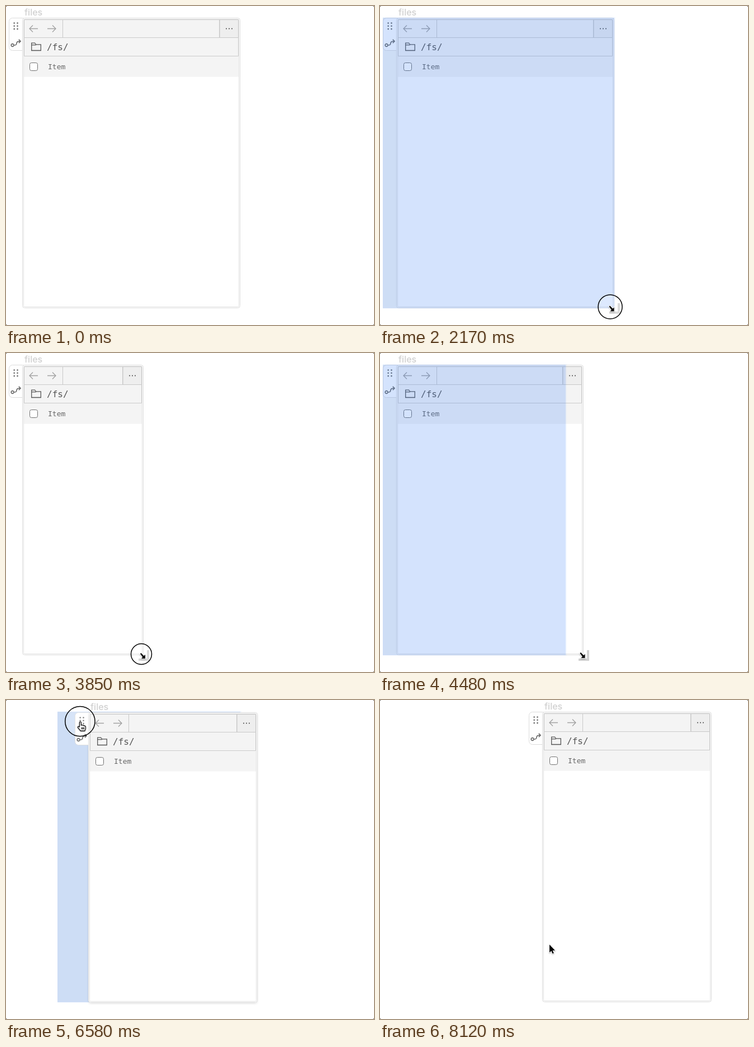
An HTML page with a canvas for the animation above (8.19 s loop, 658 by 570 pixels).

```html
<!DOCTYPE html>
<html lang="en">
<head>
<meta charset="utf-8">
<title>File panel</title>
<style>
  html, body { margin: 0; width: 100%; height: 100%; overflow: hidden; background: #fff; }
  canvas { display: block; width: 658px; height: 570px; }
</style>
</head>
<body>
<canvas id="stage" width="658" height="570"></canvas>
<script>
const ctx = document.getElementById('stage').getContext('2d');
const LOOP = 8190, TICK = 70, CELL = 87;
const MONO = '"DejaVu Sans Mono", monospace';
const GRIP = { x: 15.3, y: 36.3 };

const progress = (t, from, to) => Math.min(1, Math.max(0, (t - from) / (to - from)));
const ease = k => (1 - Math.cos(Math.PI * k)) / 2;
const mix = (a, b, k) => a + (b - a) * k;
const snap = v => CELL * Math.round(v / CELL);

// Pointer moves: start, end, destination
const moves = [
  [280, 840, 416, 538], [2100, 2800, 235, 517], [3220, 3710, 242, 538],
  [3850, 4480, 359.5, 537], [4480, 4830, 83, 130], [4970, 5180, 50, 84],
  [5320, 5600, 86, 66], [5600, 5950, GRIP.x, GRIP.y], [6230, 6930, 249.5, 40],
  [7630, 7840, 287, 240], [7980, 8120, 303, 437]
];
const presses = [
  { from: 1050, to: 1400, r: 19, grown: 32 },
  { from: 1540, to: 2800, r: 18.5, grown: 22.5 },
  { from: 3850, to: 4480, r: 18.5, grown: 20.5 },
  { from: 6090, to: 7210, r: 21.5, grown: 30.3 }
];
const highlights = [
  { from: 2170, release: 2800, to: 3150 },
  { from: 3990, release: 4480, to: 4830 },
  { from: 6300, release: 7140, to: 7420, drag: true }
];
const activeAt = (list, t) => list.find(s => t >= s.from && t < s.to);

function pointerAt(t) {
  let x = 356, y = 566;
  for (const [from, to, toX, toY] of moves) {
    const k = ease(progress(t, from, to));
    x = mix(x, toX, k);
    y = mix(y, toY, k);
  }
  return { x, y };
}

function panelRight(t, x) {
  if (t < 2100) return 418;
  if (t < 2800) return Math.min(418, Math.round(x + 10));
  if (t < 3850) return 245;
  if (t < 4480) return Math.round(x + 3.4);
  return Math.round(mix(363, 331, ease(progress(t, 4480, 4690))));
}

function panelOffset(t, p) {
  if (t < 6300) return { x: 0, y: 0 };
  if (t < 7210) return { x: Math.round(p.x - GRIP.x + .5), y: Math.floor(p.y - GRIP.y) };
  const k = ease(progress(t, 7140, 7420));
  return { x: Math.round(mix(235, 3 * CELL, k)), y: Math.round(mix(3, 0, k)) };
}

function rect(x, y, w, h, fill, stroke, radius = 0) {
  ctx.beginPath();
  ctx.roundRect(x, y, w, h, radius);
  if (fill) { ctx.fillStyle = fill; ctx.fill(); }
  if (stroke) { ctx.strokeStyle = stroke; ctx.lineWidth = 1; ctx.stroke(); }
}
function line(d, color, width = 1) {
  ctx.strokeStyle = color;
  ctx.lineWidth = width;
  ctx.stroke(new Path2D(d));
}
function disc(x, y, r, fill) {
  ctx.beginPath();
  ctx.arc(x, y, r, 0, 7);
  ctx.fillStyle = fill;
  ctx.fill();
}
function text(s, x, y, font, color) {
  ctx.font = font;
  ctx.fillStyle = color;
  ctx.fillText(s, x, y);
}

function drawTab() {
  rect(5.5, 21.5, 30, 58, '#fff', '#dcdcdc', 6);
  for (let i = 0; i < 6; i++)
    disc(14.7 + 5.8 * (i % 2), 30.5 + 5.3 * (i >> 1), 1.3, '#666');
  line('M14.3 70C18.5 70 18.5 69 19 66.5S20.5 63 26 63M22.8 59.8L26 63L22.8 66.2', '#666', 1.6);
  line('M9.2 70a2.4 2.4 0 1 0 4.8 0a2.4 2.4 0 1 0 -4.8 0', '#666', 1.6);
}

function drawPanel(right) {
  text('files', 33, 17, '500 16px Inter, sans-serif', '#d0d0d0');
  drawTab();
  rect(29.5, 21.5, right - 29, 518, '#fff', '#dcdcdc', 4);
  rect(31.5, 23.5, right - 33, 514, '#fff', '#e2e2e2', 2);

  const edge = right - 2.5;
  rect(32, 90, right - 34, 36.5, '#f4f4f4');
  rect(32.5, 24.5, edge - 32.5, 32, '#f4f4f4', '#cbcbcb');
  rect(32.5, 56.5, edge - 32.5, 33, '#f4f4f4', '#cbcbcb');
  rect(right - 36.5, 24.5, 34, 32, '#eee', '#c8c8c8');
  line(`M101.5 24V56M${right - 36} 24V56`, '#c8c8c8');
  for (let i = 0; i < 3; i++) disc(right - 24 + 5 * i, 40.5, 1, '#444');

  line('M57 40.5H42M48 34.5L42 40.5L48 46.5M74 40.5H89M83 34.5L89 40.5L83 46.5', '#a2a2a2', 1.3);
  line('M45.7 79.5V66.2H51.5L53.7 68.8H62.3V79.5ZM45.7 69.7H53.7', '#555', 1.3);
  text('/fs/', 73, 79, '16px ' + MONO, '#555');
  rect(42.5, 101.5, 14, 14, '#fff', '#707070', 3);
  text('Item', 75, 113, '13px ' + MONO, '#666');
}

function drawTint(left, right) {
  rect(left, 20, right - left + 2, 521, 'rgba(60,130,245,.05)');
  rect(left, 21, right - left, 519, 'rgba(60,130,245,.18)');
}

function drawHandle(right, alpha) {
  ctx.globalAlpha = alpha;
  line(`M${right + 9} 531V548H${right - 8}`, '#d0d0d0', 4);
  ctx.globalAlpha = 1;
}

function drawRing({ x, y }, r) {
  disc(x, y, r, 'rgba(255,255,255,.2)');
  ctx.strokeStyle = '#000';
  ctx.lineWidth = 1.5;
  ctx.stroke();
}

const cursors = {
  arrow: { d: 'M0 0V14.2L3.3 11.2L5.6 16.2L7.8 15.2L5.6 10.4H10Z', fill: '#000', edge: '#fff' },
  resize: { d: 'M-2 -.6L-.6 -2L4.6 3.2L7 .9V8H-.1L2.3 5.5Z', fill: '#000', edge: '#fff' },
  hand: {
    d: 'M-1 10V2.2Q-1 .6 .5 .6T2 2.2V7Q3.5 5.7 5 7.2Q6.6 6.4 7.6 8Q10 7.6 10 10V13L8.5 17H1L-4 11Q-4.4 8.8 -2.4 9Z' +
       'M3 10.5V14M5 10.5V14M7 10.5V14',
    fill: '#fff', edge: '#000'
  }
};
function drawCursor(kind, { x, y }) {
  const { d, fill, edge } = cursors[kind], path = new Path2D(d), hand = kind === 'hand';
  ctx.save();
  ctx.translate(x, y);
  ctx.lineJoin = 'round';
  ctx.strokeStyle = edge;
  ctx.fillStyle = fill;
  ctx.lineWidth = hand ? 1.1 : 2;
  ctx.shadowColor = 'rgba(0,0,0,.3)';
  ctx.shadowBlur = 2;
  ctx.shadowOffsetY = 1;
  if (hand) ctx.fill(path);
  ctx.stroke(path);
  ctx.shadowColor = 'transparent';
  if (!hand) ctx.fill(path);
  ctx.restore();
}

function draw(t) {
  const pointer = pointerAt(t);
  const right = panelRight(t, pointer.x);
  const offset = panelOffset(t, pointer);
  const highlight = activeAt(highlights, t);
  const press = activeAt(presses, t);
  const dragging = highlight && highlight.drag;

  const left = 5 + (dragging ? snap(offset.x) : 0);
  const snapRight = dragging ? left + 327 : 332 + snap(right - 332);
  const fade = highlight ? 1 - progress(t, highlight.release, highlight.to) : 0;

  ctx.fillStyle = '#fff';
  ctx.fillRect(0, 0, 658, 570);

  ctx.globalAlpha = fade;
  if (highlight) rect(left, 21, snapRight - left, 519, '#f6f6f4');
  if (dragging) drawTint(left, snapRight);
  ctx.globalAlpha = 1;

  ctx.save();
  ctx.translate(offset.x, offset.y);
  if (dragging) {
    ctx.shadowColor = 'rgba(0,0,0,.14)';
    ctx.shadowBlur = 4;
    ctx.shadowOffsetY = 1;
    rect(30, 22, right - 30, 518, '#fff', null, 4);
    ctx.shadowColor = 'transparent';
  }
  drawPanel(right);
  ctx.restore();

  ctx.globalAlpha = fade;
  if (highlight && !dragging) drawTint(left, snapRight);
  ctx.globalAlpha = 1;

  // The handle and resize cursor belong to the panel's lower right corner
  const reach = Math.hypot(right - 2 - pointer.x, 538 - pointer.y);
  drawHandle(right, progress(reach, 14, 4));
  if (press) drawRing(pointer, mix(press.r, press.grown, progress(t, press.from, press.from + 840)));
  if (t >= 280) drawCursor(dragging ? 'hand' : reach < 6 ? 'resize' : 'arrow', pointer);

  // Rounded window corners
  ctx.beginPath();
  ctx.rect(0, 0, 658, 570);
  ctx.roundRect(0, 0, 658, 570, 2.5);
  ctx.fillStyle = '#444';
  ctx.fill('evenodd');
}

const start = performance.now();
function loop() {
  const t = (performance.now() - start) % LOOP;
  draw(Math.floor(t / TICK) * TICK);
  requestAnimationFrame(loop);
}
loop();
</script>
</body>
</html>
```
